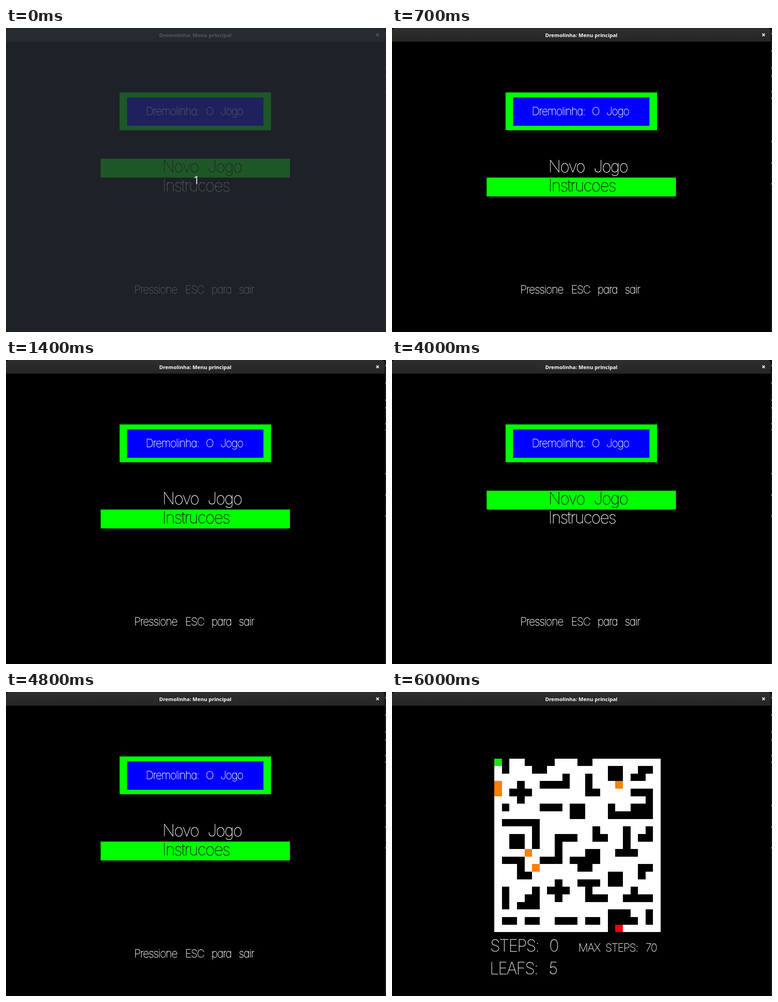
These frames come from a looping animation (836 px wide and 670 px high, 9500 ms). An HTML page:

```html
<!DOCTYPE html>
<html lang="pt">
<head>
<meta charset="utf-8">
<title>Dremolinha</title>
<style>
html, body { margin: 0; width: 100%; height: 100%; overflow: hidden; background: #000; }
svg { display: block; }
.maze { shape-rendering: crispEdges; }
.thin {
  font-family: Inter, Lato, sans-serif; font-weight: 100;
  font-feature-settings: "cv11"; font-optical-sizing: none;
  letter-spacing: -.055em; word-spacing: .44em;
}
.bar { font: 700 11.4px "Noto Sans", sans-serif; fill: #fff; text-anchor: middle; }
.count { font: 400 25px "Noto Sans", sans-serif; fill: #dcdcdc; text-anchor: middle; }
</style>
</head>
<body>
<svg id="stage" width="836" height="670" viewBox="0 0 836 670"></svg>
<script>
const LOOP = 9500, CELL = 16.64;
const GREEN = "#0f0", ORANGE = "#ff8000", RED = "#f00", WHITE = "#fff";

// # wall, o leaf, P player, X exit
const LEVEL = `
P#..####...##.........
.#...##........##..##.
.........#..#..##.##..
o..#..####..#...o.....
o.###.......##....###.
...#................#.
.#....###.##...#..###.
..........##...######.
.#####................
.....#.......#...#..#.
..##.#..###..##..#.##.
..##.#..#........#....
....o...#...##..###...
.###..###.####........
...#.o.....##......##.
...##..........##..#..
........#..###.##.....
.#...#.###..#.....#...
.#..##..#...###..####.
.#.###................
...............###..#.
.##.##..###.##.####.#.
...............#X.....`.trim().split("\n");
const TILES = { "#": "#000", o: ORANGE, P: "#1ae600", X: RED };

const rect = (x, y, w, h, fill, extra = "") =>
  `<rect x="${x}" y="${y}" width="${w}" height="${h}" fill="${fill}" ${extra}/>`;

// A hairline outline keeps the strokes near one pixel at every size.
const thin = (text, x, y, size, color = WHITE) =>
  `<text class="thin" x="${x}" y="${y}" font-size="${size}" fill="${color}" stroke="${color}"
    stroke-width="${Math.max(.4, 1 - .024 * size)}">${text}</text>`;

const phrases = (y, size, ...parts) =>
  parts.map(([x, text, color]) => thin(text, x, y, size, color)).join("");

function frame() {
  const specks = [12, 50, 88, 105, 140, 154, 250, 297, 343]
    .map(y => rect(834.5, y - 1, 1.5, 3, "#999")).join("");
  return `<defs><linearGradient id="barFill" x2="0" y2="1">
      <stop stop-color="#2e2e2e"/><stop offset="1" stop-color="#262626"/>
    </linearGradient></defs>` +
    rect(0, 0, 836, 670, "#000") + rect(833, 0, 3, 670, "#141414") + specks +
    `<path d="M0 30V7Q0 0 7 0H826Q833 0 833 7V30Z" fill="url(#barFill)"/>
    <text class="bar" x="416.5" y="19.7">Dremolinha: Menu principal</text>
    <path d="M814.7 12.2l5.6 5.6m0-5.6l-5.6 5.6" stroke="#fff" stroke-width="1.9"/>`;
}

function menu(selected) {
  const color = i => i === selected ? "#000" : WHITE;
  return rect(249.9, 142, 333.2, 83.3, GREEN) + rect(266.5, 153, 299.9, 62.5, "#00f") +
    phrases(192, 24, [307.5, "Dremolinha:"], [439.5, "O"], [471.5, "Jogo"]) +
    rect(208.2, 288 + 41.6 * selected, 416.5, 41.6, GREEN) +
    phrases(318, 36, [344, "Novo", color(0)], [443.5, "Jogo", color(0)]) +
    thin("Instrucoes", 344, 360, 36, color(1)) +
    phrases(585, 24, [282, "Pressione"], [394, "ESC"], [452, "para"], [512, "sair"]);
}

function help() {
  return thin("Como jogar?", 307, 192, 24) +
    phrases(268, 12, [83, "Voce eh a Dremolinha !"], [225.5, "Seu objetivo eh comer"],
      [359, "as folhas"], [414.5, "espalhadas pelo labirinto."],
      [551.5, "Elas se parecem"], [650.5, "com isso"], [709, "-&gt;"]) +
    rect(737, 260.5, 8.5, 8.5, ORANGE) +
    phrases(292.5, 12, [83, "Para se movimentar"], [200.5, "use as setas do teclado,"],
      [344.5, "e tente chegar"], [433, "ao final do labirinto"]) +
    rect(545.5, 285, 8.5, 8.5, RED) +
    phrases(291.5, 12, [562, "usando o menor"], [661, "numero de passos"]) +
    thin("possivel!", 82.5, 309.7, 12) +
    phrases(585, 24, [165.5, "Pressione V"], [308.5, "para voltar"], [437, "ao menu principal"]);
}

function game() {
  const left = 225, top = 146.5;
  let maze = rect(left, top, 22 * CELL, 23 * CELL, WHITE);
  LEVEL.forEach((row, r) => [...row].forEach((tile, c) => {
    if (TILES[tile]) maze += rect(left + c * CELL, top + r * CELL, CELL, CELL, TILES[tile]);
  }));
  return `<g class="maze">${maze}</g>` + phrases(572, 36, [216, "STEPS:"], [346, "0"]) +
    phrases(571.5, 24, [410, "MAX"], [469.5, "STEPS:"], [558, "70"]) +
    phrases(622, 36, [215, "LEAFS:"], [345, "5"]);
}

const countdown = () => menu(0) + rect(0, 0, 836, 670, "#272a33", 'opacity=".79"') +
  '<text class="count" x="419" y="344">1</text>';

const scenes = { countdown: countdown(), play: menu(0), info: menu(1), help: help(), game: game() };
const timeline = [[0, "countdown"], [100, "play"], [700, "info"], [1100, "play"], [1400, "info"],
  [1800, "help"], [4000, "play"], [4800, "info"], [5300, "play"], [6000, "game"]];

const stage = document.getElementById("stage"), base = frame();
let shown;
function draw() {
  const t = performance.now() % LOOP;
  const name = timeline.filter(([start]) => start <= t).pop()[1];
  if (name !== shown) stage.innerHTML = base + scenes[shown = name];
  requestAnimationFrame(draw);
}
draw();
</script>
</body>
</html>
```
